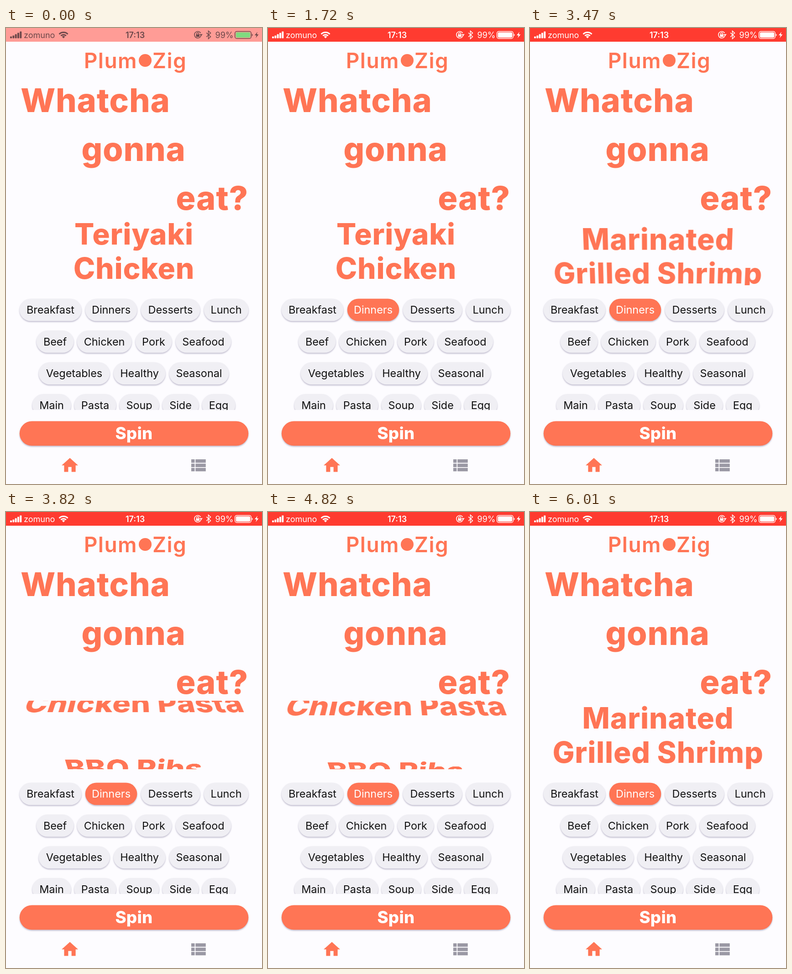
An HTML page for the animation above (6040 ms loop, 561 px wide and 998 px high).

```html
<!DOCTYPE html>
<html lang="en">
<head>
<meta charset="utf-8">
<title>Meal wheel</title>
<style>
  html, body { margin: 0; width: 100%; height: 100%; overflow: hidden; background: #fdfcff; }
  body { position: relative; font-family: Inter, sans-serif; }
  svg { position: absolute; left: 0; top: 0; font-family: Inter, sans-serif; }
  .coral { fill: #ff7555; }
  .title { font-size: 72px; font-weight: 800; letter-spacing: .8px; }
  .brand { font-size: 46px; font-weight: 600; letter-spacing: 1.5px; }
  .raised { filter: drop-shadow(0 2.5px 1.5px rgba(60, 50, 100, .32)); }
  .chip rect { fill: #f0eff4; }
  .chip text { font-size: 23.4px; text-anchor: middle; fill: #111; }
  .chip.on rect { fill: #ff7555; }
  .chip.on text { fill: #fff; }
  #status { color: #fff; font-size: 18px; }
  #status text, .ink { fill: currentColor; }
  .line { fill: none; stroke: currentColor; stroke-width: 1.5; }
  .thick { stroke-width: 3; }
  #wheel { position: absolute; left: 0; top: 413px; width: 561px; height: 149.5px; overflow: hidden; }
  .card {
    position: absolute; inset: 0; display: flex; align-items: center; justify-content: center;
    color: #ff7555; font-weight: 800; font-size: 70px; line-height: 75px; letter-spacing: .5px;
    text-align: center; white-space: pre;
  }
  .card.double { font-size: 64px; letter-spacing: .8px; }
</style>
</head>
<body>
<svg width="561" height="998" viewBox="0 0 561 998">
  <defs><clipPath id="chipArea"><rect y="580" width="561" height="256"/></clipPath></defs>

  <g id="status">
    <rect id="bar" width="561" height="30"/>
    <g id="signal" class="ink"></g>
    <text x="39" y="21.5">zomuno</text>
    <path class="line thick" d="M116.5 13.5A13.5 13.5 0 0 1 135.5 13.5M120.3 17A8.2 8.2 0 0 1 131.7 17"/>
    <path class="ink" d="M126 22.5l-3.3-3.6a5 5 0 0 1 6.6 0z"/>
    <text x="283" y="21.5" text-anchor="middle" font-weight="600">17:13</text>
    <path class="line" d="M426.5 11A7.3 7.3 0 1 0 427.5 15.5"/>
    <path class="ink" d="M424 13.5h7l-3.5 4zM416.5 14h7.5v5.5h-7.5z"/>
    <path class="line" d="M418 14.5v-2a2.2 2.2 0 0 1 4.4 0v2"/>
    <path class="line" d="M439 10.5l9.5 8.5-5 4.500V6.5l5 4.5-9.5 8.5"/>
    <text x="458.5" y="21.5">99%</text>
    <rect class="line" x="501.7" y="7.5" width="35.6" height="15.5" rx="4"/>
    <rect id="charge" x="503.8" y="9.6" width="31.4" height="11.3" rx="2.2"/>
    <path class="ink" d="M538.8 12.5a3 3 0 0 1 0 5.5z"/>
    <path class="ink" d="M551 8.5l-6 7.5h4l-1.8 6 6.3-8h-4z"/>
  </g>

  <g class="coral">
    <text class="brand" x="288" y="88" text-anchor="end">Plum</text>
    <circle cx="305" cy="71" r="14"/>
    <text class="brand" x="321" y="88">Zig</text>
    <text class="title" x="32" y="184">Whatcha</text>
    <text class="title" x="279.5" y="291" text-anchor="middle">gonna</text>
    <text class="title" x="531" y="398" text-anchor="end">eat?</text>
  </g>

  <g id="chips" clip-path="url(#chipArea)"></g>

  <rect class="coral raised" x="29.7" y="860.5" width="501.6" height="53.8" rx="26.9"/>
  <text x="280.5" y="900" text-anchor="middle" fill="#fff" font-size="36.5" font-weight="800" letter-spacing=".3">Spin</text>
  <path class="coral" transform="translate(118.4 935.6) scale(1.8)" d="M10 20v-6h4v6h5v-8h3L12 3 2 12h3v8z"/>
  <path fill="#9a98a4" transform="translate(398.5 934.7) scale(1.87)"
    d="M4 5h4v4H4zM4 10h4v4H4zM4 15h4v4H4zM9 5h12v4H9zM9 10h12v4H9zM9 15h12v4H9z"/>
</svg>
<div id="wheel"></div>

<script>
const LOOP = 6040, SELECT_AT = 1720;
const STEP = 60, RADIUS = 150, DEPTH = 333;   // degrees per dish, wheel radius, perspective
const $ = id => document.getElementById(id);

const dishes = ['Teriyaki\nChicken', 'Maple Salmon', 'Marinated\nGrilled Shrimp',
  'Beef Stew', 'Roast\nTurkey', 'Chicken Pasta', 'BBQ Ribs'];

// Each chip: label, left edge, right edge
const chipRows = [
  [['Breakfast', 30, 165], ['Dinners', 174, 287], ['Desserts', 296, 425], ['Lunch', 434, 531]],
  [['Beef', 67, 148], ['Chicken', 156, 275], ['Pork', 284, 363], ['Seafood', 372, 493]],
  [['Vegetables', 72, 227], ['Healthy', 236, 349], ['Seasonal', 358, 488]],
  [['Main', 58, 142], ['Pasta', 150, 241], ['Soup', 249, 335], ['Side', 343, 422], ['Egg', 430, 502]]
];

// Wheel travel: time in ms, dishes passed, dishes per second
const spin = [[3290, 0, 11], [3470, 1.917, 10.4], [4190, 8.683, 7.4],
  [4820, 12.43, 4.9], [5410, 14.8, 3.1], [6010, 16, 0]];

$('signal').innerHTML = [4, 6, 9, 12, 15].map((h, i) =>
  `<rect x="${9 + i * 5.3}" y="${22.5 - h}" width="4" height="${h}" rx="1"/>`).join('');

$('chips').innerHTML = chipRows.map((row, r) => {
  const y = 592.5 + r * 69.5;
  return row.map(([label, left, right]) => `<g class="chip" id="chip-${label}">
    <rect class="raised" x="${left - .3}" y="${y}" width="${right - left + .6}" height="48.8" rx="24.4"/>
    <text x="${(left + right) / 2}" y="${y + 32.5}">${label}</text></g>`).join('');
}).join('');

const cards = dishes.map(name => {
  const card = document.createElement('div');
  card.className = name.includes('\n') ? 'card double' : 'card';
  card.textContent = name;
  return $('wheel').appendChild(card);
});

const clamp = x => Math.min(1, Math.max(0, x));
const mix = (a, b, u) => `rgb(${a.map((v, i) => Math.round(v + (b[i] - v) * u))})`;

function wheelPosition(t) {
  if (t <= spin[0][0]) return 0;
  const next = spin.findIndex(k => k[0] > t);
  if (next < 0) return spin[spin.length - 1][1];
  const [t0, p0, v0] = spin[next - 1], [t1, p1, v1] = spin[next];
  const span = (t1 - t0) / 1000, u = (t - t0) / (t1 - t0), w = 1 - u;
  return w * w * ((1 + 2 * u) * p0 + u * span * v0) + u * u * ((3 - 2 * u) * p1 - w * span * v1);
}

function drawWheel(t) {
  const position = wheelPosition(t), count = dishes.length;
  cards.forEach((card, i) => {
    let offset = (i - position) % count;
    if (offset < -count / 2) offset += count;
    const angle = offset * STEP;
    card.style.visibility = Math.abs(angle) < 85 ? 'visible' : 'hidden';
    card.style.transform = `perspective(${DEPTH}px) translateZ(${-RADIUS}px) ` +
      `rotateX(${-angle}deg) translateZ(${RADIUS}px)`;
  });
}

function drawStatus(t) {
  const u = clamp((t - 10) / 400), white = [255, 255, 255];
  $('bar').style.fill = mix([255, 156, 150], [255, 59, 48], u);
  $('status').style.color = mix([108, 72, 74], white, u);
  $('charge').style.fill = mix([128, 218, 128], white, u);
}

function frame() {
  const t = performance.now() % LOOP;
  drawStatus(t);
  drawWheel(t);
  $('chip-Dinners').classList.toggle('on', t >= SELECT_AT);
  requestAnimationFrame(frame);
}
frame();
</script>
</body>
</html>
```
